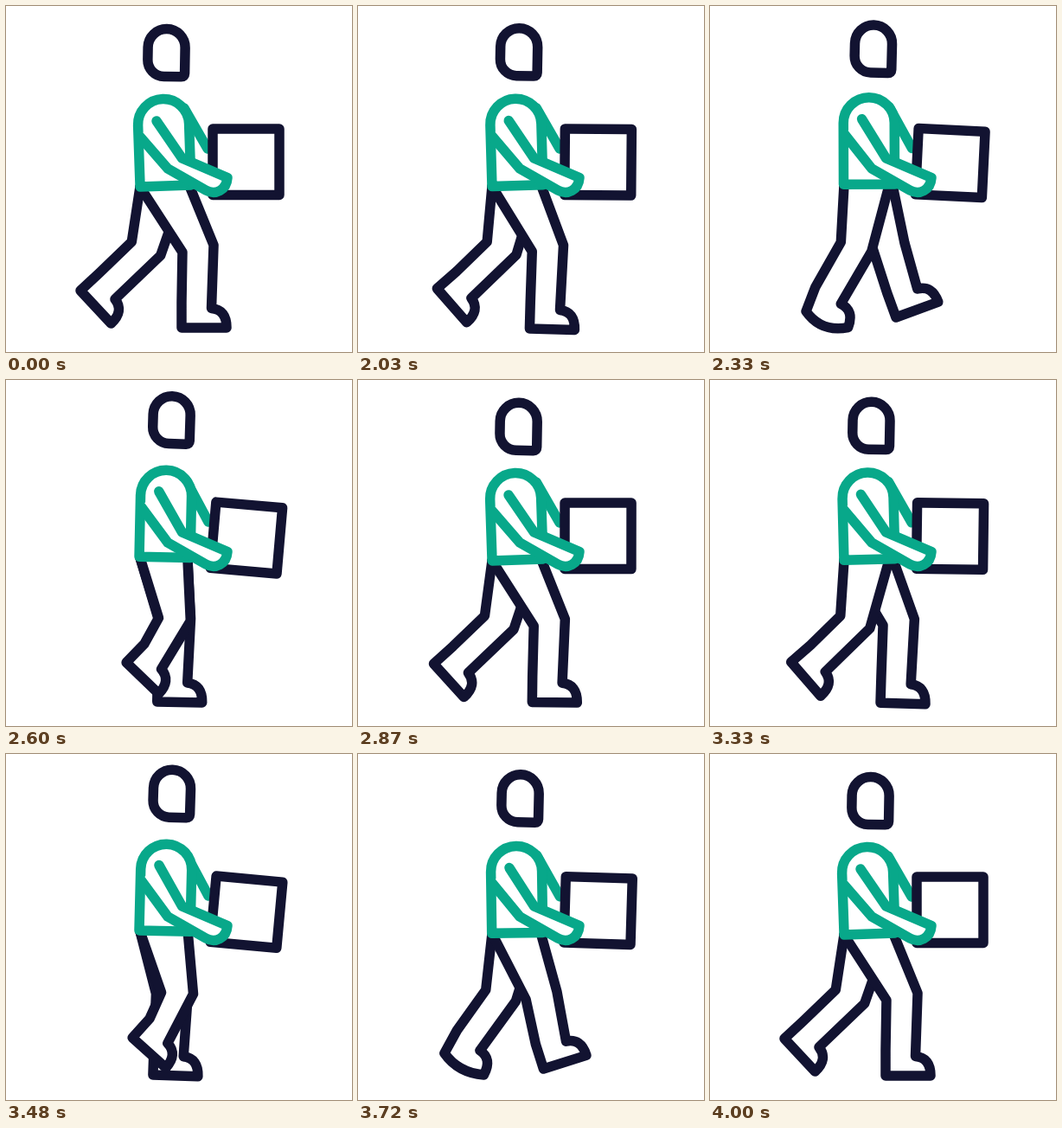
Recreate the animation shown at these times as an HTML page. Size 400 px wide and 400 px high, loop 4.06 s.

```html
<!DOCTYPE html>
<html lang="en">
<head>
<meta charset="utf-8">
<title>Walking with a box</title>
<style>
  html, body { margin: 0; width: 100%; height: 100%; overflow: hidden; background: #fff; }
  svg { display: block; width: 100%; height: 100%; fill: #fff; stroke-width: 11.5; stroke-linejoin: round; stroke-linecap: round; }
  .navy { stroke: #121331; }
  .green { stroke: #08a88a; }
</style>
</head>
<body>
<svg viewBox="0 0 400 400">
  <path id="farLeg" class="navy"/>
  <path id="nearLeg" class="navy"/>
  <path id="farArm" class="green"/>
  <path id="torso" class="green" d="M155 208V137a29.5 29.5 0 0 1 59 0V208Z"/>
  <rect id="box" class="navy" x="239" y="142" width="77" height="76.5"/>
  <path id="nearArm" class="green"/>
  <path id="head" class="navy" d="M203 81.5q4 0 4 -4V48a21.5 21.5 0 0 0 -43 0V62.5a19 19 0 0 0 19 19Z"/>
</svg>
<script>
const LOOP = 4060, START = 2000, WALK = 2000, STEP = 430, BRAKE = 1440;

// One stride of a leg, two steps long
const STRIDE = [
  { at: 0,    knee: 222, heel: [203, 372], tilt: 0 },    // landed
  { at: .44,  knee: 192, heel: [170, 371], tilt: 2 },    // under the body
  { at: .77,  knee: 169, heel: [111, 353], tilt: 21 },   // pushing off
  { at: 1,    knee: 162, heel: [86, 329],  tilt: 47 },   // lifting
  { at: 1.44, knee: 198, heel: [146, 328], tilt: 42 },   // passing
  { at: 1.67, knee: 207, heel: [193, 355], tilt: 13 },   // reaching
  { at: 1.77, knee: 207, heel: [215, 360], tilt: -20 }   // toe up
];

const $ = id => document.getElementById(id);

// Key by any index, with the time unwrapped
function key(i) {
  const n = STRIDE.length, turn = Math.floor(i / n);
  const { at, knee, heel, tilt } = STRIDE[i - turn * n];
  return { at: at + 2 * turn, v: [knee, ...heel, tilt] };
}

// Smooth cyclic interpolation between the keys
function strideAt(q) {
  q %= 2;
  let i = STRIDE.length - 1;
  while (STRIDE[i].at > q) i--;
  const [a, b, c, d] = [i - 1, i, i + 1, i + 2].map(key);
  const h = c.at - b.at, x = (q - b.at) / h;
  return b.v.map((p, k) => {
    const m0 = (c.v[k] - a.v[k]) / (c.at - a.at) * h;
    const m1 = (d.v[k] - p) / (d.at - b.at) * h;
    const e = c.v[k] - p;
    return p + x * (m0 + x * (3 * e - 2 * m0 - m1 + x * (m0 + m1 - 2 * e)));
  });
}

// Trouser leg with a rigid boot; the knee lies square to the line from hip to ankle
function legPath(q, rise) {
  const [kneeX, heelX, heelY, tilt] = strideAt(q);
  const turn = tilt * Math.PI / 180, cos = Math.cos(turn), sin = Math.sin(turn);
  const boot = (along, up) => [heelX + along * cos + up * sin, heelY + along * sin - up * cos];
  const hipY = 209 - 4 * rise, kneeY = 280.5 - 4 * rise;
  const [ankleX, ankleY] = boot(17, 27);
  const lean = .85 * Math.atan2(183 - ankleX, ankleY - hipY);
  const dx = 18.5 * Math.cos(lean), dy = 18.5 * Math.sin(lean);
  const bend = 17 * Math.max(0, Math.sin(2 * Math.PI * (q % 2 - .5))) ** 2 * (q % 2 < 1);
  return `M155 ${hipY}L${kneeX - dx} ${kneeY - dy} ${boot(0, 30)} ${boot(0, 0)}` +
    `Q${boot(25, -bend)} ${boot(52, 0)}Q${boot(52, 21)} ${boot(34.5, 22.5)}` +
    `L${kneeX + dx} ${kneeY + dy} ${208.5 + (kneeX + dx - 200) * .1} ${hipY}`;
}

// Steps walked: steady pace, then braking to a stop
function stepsAt(t) {
  const s = t - START;
  if (s < 30) return 0;
  if (s < BRAKE) return s / STEP;
  const rest = Math.max(0, WALK - s);
  return 4 - rest * rest / (2 * (WALK - BRAKE) * STEP);
}

function draw(now) {
  const p = stepsAt(now % LOOP);
  const u = Math.abs(Math.sin(Math.PI * p)) ** 1.6; // rise of the body
  const set = (id, name, value) => $(id).setAttribute(name, value);

  set('nearLeg', 'd', legPath(p, u));
  set('farLeg', 'd', legPath(p + 1, u));
  set('torso', 'transform', `translate(${-u} ${-3.5 * u}) rotate(${-2 + 3.5 * u} 184 206)`);
  set('head', 'transform', `translate(${6.5 * u} ${-8.5 * u}) rotate(${1 + .8 * u} 186 54)`);
  set('box', 'transform', `translate(${.5 * u} ${2.5 * u}) rotate(${5.4 * u} 277.5 180)`);
  set('farArm', 'd', `M${206 + 2 * u} ${118 - 3 * u}L${233 + u} ${165 - u}`);
  set('nearArm', 'd', `M${174 + 3 * u} ${133 - 4.5 * u}L203.5 176 256 198.5` +
    `C255 213 242 219 231 213L187 188 ${154 + 2 * u} ${150 - 4.5 * u}`);
  requestAnimationFrame(draw);
}
requestAnimationFrame(draw);
</script>
</body>
</html>
```
